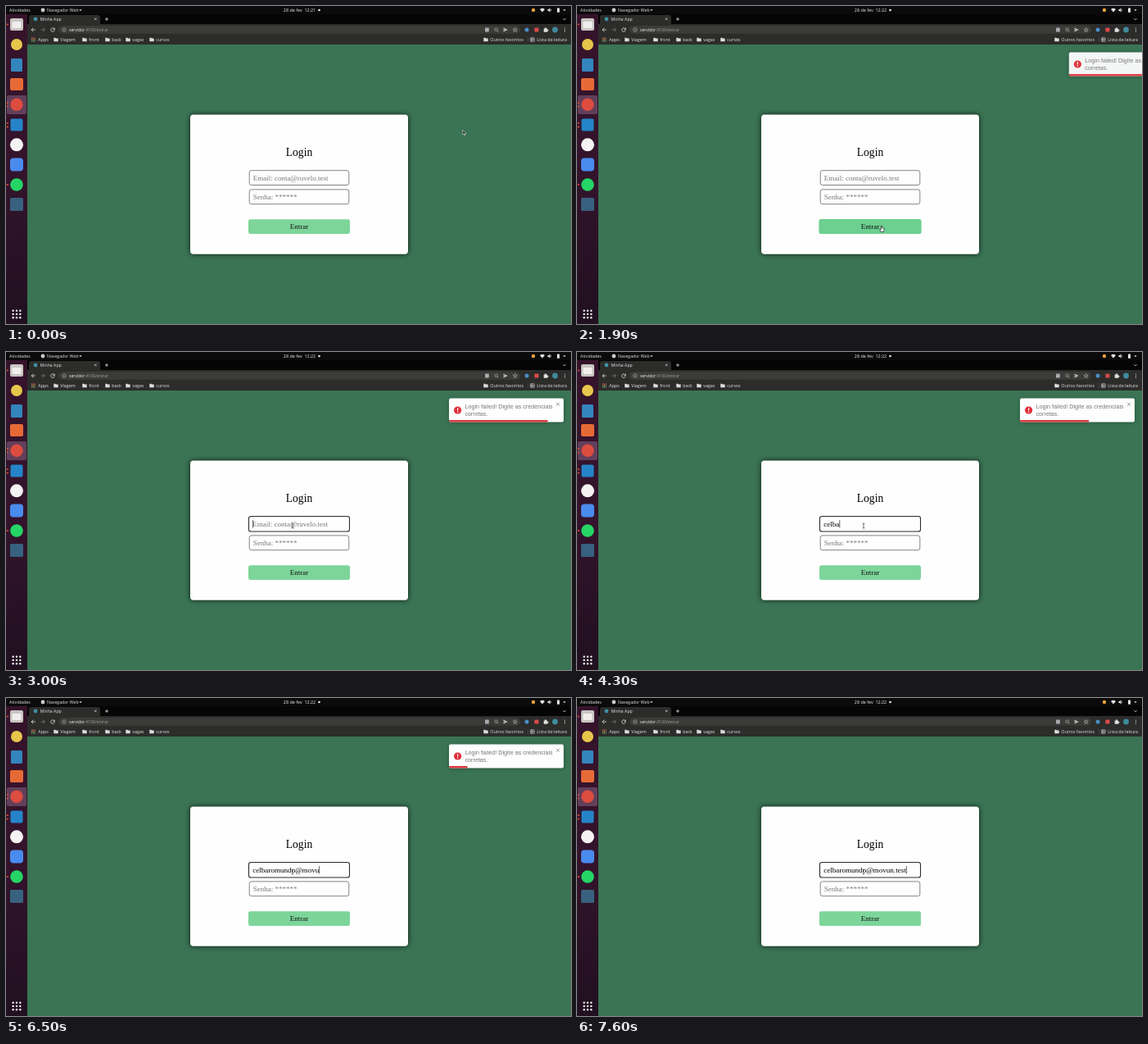
An HTML page with a canvas for the animation above (8000 ms loop, 690 px wide and 388 px high).

```html
<!DOCTYPE html>
<html lang="pt">
<head>
<meta charset="utf-8">
<style>
html, body { margin: 0; width: 100%; height: 100%; overflow: hidden; background: #3a7454; }
canvas { display: block; }
</style>
</head>
<body>
<canvas id="stage" width="690" height="388"></canvas>
<script>
const g = document.getElementById('stage').getContext('2d');
const UI = '"Open Sans", "Noto Sans", sans-serif';
const SERIF = '"Liberation Serif", serif';
const SANS = '"Liberation Sans", sans-serif';
const LOOP = 8000;

const EMAIL = 'celbaromundo@movun.test';
const KEYS = [3700, 3850, 4000, 4150, 4280, 4450, 4600, 4750, 4900, 5000, 5150, 5400,
  5800, 6150, 6300, 6400, 6500, 6700, 6950, 7150, 7250, 7350, 7500];
const FOCUS = 2930;
const TOAST_IN = 1633, BAR_START = 2305, BAR_TIME = 5000, TOAST_OUT = BAR_START + BAR_TIME;

const clamp = v => Math.max(0, Math.min(1, v));
const lerp = (a, b, p) => a + (b - a) * p;
const outCubic = p => 1 - (1 - p) ** 3;
const smooth = p => p * p * (3 - 2 * p);

function text(s, x, y, size, color, font = UI, align = 'left') {
  g.font = `${size}px ${font}`;
  g.fillStyle = color;
  g.textAlign = align;
  g.fillText(s, x, y);
}
function rect(x, y, w, h, color, r = 0) {
  g.fillStyle = color;
  g.beginPath();
  g.roundRect(x, y, w, h, r);
  g.fill();
}
function disc(x, y, r, color) {
  g.fillStyle = color;
  g.beginPath();
  g.arc(x, y, r, 0, 7);
  g.fill();
}
function frame(x, y, w, h, r, color, width) {
  g.strokeStyle = color;
  g.lineWidth = width;
  g.beginPath();
  g.roundRect(x, y, w, h, r);
  g.stroke();
}
function trace(d, x, y, color, width = 0.8) {
  g.save();
  g.translate(x, y);
  g.strokeStyle = color;
  g.lineWidth = width;
  g.stroke(new Path2D(d));
  g.restore();
}
function solid(d, x, y, color) {
  g.save();
  g.translate(x, y);
  g.fillStyle = color;
  g.fill(new Path2D(d));
  g.restore();
}
function shadow(color, blur, y = 0) {
  g.shadowColor = color;
  g.shadowBlur = blur;
  g.shadowOffsetY = y;
}
const noShadow = () => shadow('transparent', 0);
const cross = (x, y, r, color, w) => trace(`M${-r} ${-r}L${r} ${r}M${r} ${-r}L${-r} ${r}`, x, y, color, w);
const folder = (x, y) => solid('M-2.7-2.2h2l.8.8h2.6v3.6h-5.4z', x, y, '#dcdcdc');

function topBar(t) {
  rect(0, 0, 690, 10, '#0b0b0b');
  text('Atividades', 4, 6.9, 5.4, '#e4e4e4');
  disc(45, 5, 2.4, '#ccc');
  text('Navegador Web', 50, 6.9, 5.2, '#e4e4e4');
  solid('M-1.6-.8h3.2l-1.6 2z', 91, 5, '#ddd');
  text('28 de fev  ' + (t < 900 ? '12:21' : '12:22'), 358.5, 6.9, 5.4, '#eee', UI, 'center');
  disc(382.5, 5, 1.3, '#eee');
  disc(644, 5, 2.2, '#e8a13c');
  solid('M0 2.4L-3-1Q0-3.4 3-1z', 655, 5, '#e4e4e4');
  solid('M-2.5-.9h1.2L.4-2.4v4.8l-1.7-1.5h-1.2z', 664, 5, '#e4e4e4');
  trace('M1.2-1.4Q2.4 0 1.2 1.4', 664, 5, '#e4e4e4', 0.6);
  rect(673, 2.5, 3, 5.2, '#e4e4e4', 0.5);
  solid('M-1.6-.8h3.2l-1.6 2z', 682, 5, '#ddd');
}

function browserBar() {
  rect(26, 10, 664, 12, '#050505');
  rect(28, 11, 87, 12, '#2c2c2b', [3, 3, 0, 0]);
  disc(36, 16, 2.4, '#3f8fa3');
  text('Minha App', 41.5, 17.9, 5.2, '#e6e6e6');
  cross(109.3, 15.8, 1.3, '#ddd', 0.7);
  trace('M-2 0h4M0-2v4', 123, 16, '#ddd');
  trace('M-1.7-.8L0 .9 1.7-.8', 682, 16, '#ddd');

  rect(26, 22, 664, 25, '#2c2c2b');
  rect(64, 24, 564, 9.8, '#3b3b38', 5);
  trace('M2.5 0h-5M-.2-2.3L-2.5 0l2.3 2.3', 33.5, 29, '#e0e0e0');
  trace('M-2.5 0h5M.2-2.3L2.5 0 .2 2.3', 45, 29, '#7d7d7d');
  trace('M1.7-1.5A2.3 2.3 0 1 0 2.3.4M2.4-2.4v2h-2', 57, 29, '#e0e0e0');
  trace('M2.2 0A2.2 2.2 0 1 1-2.2 0A2.2 2.2 0 1 1 2.2 0M0-.3v1.5M0-1.3v.6', 71, 29, '#bbb', 0.6);
  text('servidor', 77, 30.8, 5, '#f2f2f2');
  text(':4100/entrar', 77 + g.measureText('servidor').width, 30.8, 5, '#a2a2a0');

  rect(585, 26.6, 4.8, 4.8, '#a9acb0', 0.6);
  trace('M1.3-.4A1.7 1.7 0 1 1-2.1-.4A1.7 1.7 0 1 1 1.3-.4M.8.8L2.4 2.4', 599, 29, '#b5b7ba', 0.7);
  solid('M-2.5-2.4L2.8 0l-5.3 2.4v-1.8L.6 0l-3.1-.6z', 610, 29, '#c5c7ca');
  trace('M0-2.5L.7-.8 2.5-.7 1.1.5 1.6 2.3 0 1.3-1.6 2.3-1.1.5-2.5-.7-.7-.8z', 621.7, 29, '#c5c7ca', 0.6);
  disc(636, 29, 2.5, '#4b8fc6');
  rect(645.3, 26.4, 5.2, 5.2, '#d94a48', 1);
  solid('M-2.3-1.4h1.4a.9.9 0 1 1 1.7 0h1.4v1.4a.9.9 0 1 1 0 1.6v1.2h-4.5z', 659, 28.9, '#ddd');
  disc(670.5, 29, 3.4, '#3f8b9e');
  for (let i = -1; i < 2; i++) disc(682.5, 29 + i * 1.9, 0.6, '#ddd');

  const tints = ['#d9685c', '#e2b34c', '#69a878'];
  for (let i = 0; i < 9; i++) rect(31 + i % 3 * 1.8, 38.6 + (i / 3 | 0) * 1.8, 1.2, 1.2, tints[i / 3 | 0]);
  text('Apps', 39.3, 42.7, 5.4, '#e6e6e6');
  [['Viagem', 61], ['front', 96], ['back', 124], ['vagas', 149], ['cursos', 178]].forEach(([s, x]) => {
    folder(x, 41);
    text(s, x + 5.2, 42.7, 5.4, '#e6e6e6');
  });
  folder(586, 41);
  text('Outros favoritos', 591.3, 42.7, 5.4, '#e6e6e6');
  rect(637, 38, 0.6, 6, '#555');
  frame(640.6, 38.7, 4.6, 4.6, 0.4, '#d0d2d5', 0.6);
  trace('M-2.3-.7h4.6M-2.3.8h4.6M-.8-2.3v4.6', 642.9, 41, '#d0d2d5', 0.6);
  text('Lista de leitura', 648.3, 42.7, 5.4, '#e6e6e6');
}

function dock() {
  const fill = g.createLinearGradient(0, 10, 0, 388);
  fill.addColorStop(0, '#35132b');
  fill.addColorStop(0.5, '#34142c');
  fill.addColorStop(1, '#201020');
  rect(0, 10, 26, 378, fill);
  rect(1, 109, 24, 23, '#623f5a', 2);
  rect(5, 15, 16, 15, '#c9c5c2', 2);
  rect(7.5, 19, 11, 8, '#f1efed', 1);
  disc(13, 47, 7, '#e7c64c');
  rect(6, 64, 14, 16, '#3385bd', 1.5);
  rect(5, 88, 16, 15, '#e66a36', 2);
  disc(13, 120.3, 7.7, '#dc4c3f');
  rect(5.5, 137.5, 15, 15, '#2584c8', 2);
  disc(13, 169.3, 8, '#f4f2f3');
  rect(5, 185.5, 16, 16, '#4a8bee', 4);
  disc(13, 218, 7.8, '#25d565');
  rect(5, 234, 16, 16, '#37617f', 1.5);
  [22.5, 118, 122.5, 143, 147.5, 218].forEach(y => disc(1.9, y, 1.1, '#e3532c'));
  for (let i = 0; i < 9; i++) disc(8.7 + i % 3 * 4.3, 371.7 + (i / 3 | 0) * 4.3, 1.25, '#eee');
}

function field(y, focused) {
  if (focused) frame(296.5, y, 123, 18.5, 2.6, '#2c2c2c', 1.1);
  else frame(297.2, y + 0.2, 121.6, 17.8, 2.5, '#666', 0.8);
}

function login(t, hover) {
  shadow('rgba(0,0,0,.8)', 6);
  rect(225, 132.5, 266, 170.3, '#fefefe', 4);
  noShadow();
  text('Login', 358, 183, 13.6, '#000', SERIF, 'center');

  const focused = t >= FOCUS;
  const count = KEYS.filter(k => k <= t).length;
  const x = focused ? 301.2 : 301.8;
  field(200.5, focused);
  if (count) text(EMAIL.slice(0, count), x, 212.5, 9.1, '#000', SERIF);
  else text('Email: conta@ruvelo.test', x, 212.5, 9, '#777', SERIF);
  if (focused) {
    const since = t - (count ? KEYS[count - 1] : FOCUS);
    const end = x + (count ? g.measureText(EMAIL.slice(0, count)).width : 0);
    if (since % 1000 < 500) rect(end + 0.2, 205, 0.6, 9.5, '#000');
  }
  field(223.7, false);
  text('Senha: ******', 301.8, 235.7, 9, '#777', SERIF);

  const grow = hover ? 0.6 : 0;
  rect(296 - grow, 260.2 - grow / 5, 124 + 2 * grow, 17.8 + grow / 2.5, hover ? '#6dcf90' : '#7dd59a', 2.5);
  text('Entrar', 358, 272, 9.1, '#111', SERIF, 'center');
}

// Offset and opacity of the notice: bounce in from the right, then out again.
function toastPose(t) {
  if (t >= TOAST_OUT) {
    const p = (t - TOAST_OUT) / 700;
    if (p < 0.2) return [lerp(0, -10, smooth(p / 0.2)), 1];
    const e = smooth(clamp((p - 0.2) / 0.8));
    return [lerp(-10, 1010, e), 1 - e];
  }
  const p = clamp((t - TOAST_IN) / 700);
  const stops = [[0, 1515], [0.6, -12.6], [0.75, 5], [0.9, -2.5], [1, 0]];
  const i = Math.max(1, stops.findIndex(s => p <= s[0]));
  const [p0, x0] = stops[i - 1], [p1, x1] = stops[i];
  const e = outCubic((p - p0) / (p1 - p0));
  return [lerp(x0, x1, e), i === 1 ? e : 1];
}

function toast(t) {
  if (t < TOAST_IN) return;
  const [dx, alpha] = toastPose(t);
  if (dx > 150) return;
  g.save();
  g.translate(541 + dx, 56.5);
  g.globalAlpha = alpha;
  shadow('rgba(0,0,0,.25)', 5, 1);
  rect(0, 0, 140, 29, '#fefefe', 2);
  noShadow();
  disc(10.6, 14.5, 4.6, '#df2f3a');
  rect(10, 11.7, 1.2, 3.4, '#fff');
  rect(10, 16, 1.2, 1.2, '#fff');
  text('Login failed! Digite as credenciais', 19.5, 12.9, 7.2, '#777', SANS);
  text('corretas.', 19.5, 21.1, 7.2, '#777', SANS);
  cross(133, 7.2, 1.9, '#888', 0.9);
  rect(0, 26.5, 140 * (1 - clamp((t - BAR_START) / BAR_TIME)), 2.5, '#dc3940', [0, 0, 0, 2]);
  g.restore();
}

function pointer(t) {
  const a = smooth(clamp((t - 450) / 900)), b = smooth(clamp((t - 2500) / 380));
  return [lerp(lerp(558, 372, a), 350, b), lerp(lerp(151.5, 269, a), 212, b)];
}
const inside = (x, y, top, bottom) => x > 296 && x < 420 && y > top && y < bottom;

function cursor(x, y) {
  if (inside(x, y, 260, 278)) {
    const hand = 'M-.6-.8Q0-1.5.6-.8V1.6L2.8 2.2Q3.4 2.7 3 4.2L2.3 6.6H-.9L-2.5 3.7Q-2.4 2.8-.6 3.6z';
    solid(hand, x, y, '#f4f4f4');
    trace(hand, x, y, '#222', 0.7);
  } else if (inside(x, y, 200, 219) || inside(x, y, 223, 242)) {
    trace('M-1.3-2.8H1.3M0-2.8V2.8M-1.3 2.8H1.3', x, y, '#333', 0.7);
  } else {
    const arrow = 'M0 0V5.4L1.2 4.3 2.1 6.4 3 6 2.1 4H3.8z';
    solid(arrow, x, y, '#111');
    trace(arrow, x, y, '#eee', 0.6);
  }
}

function draw(now) {
  const t = now % LOOP;
  const [x, y] = pointer(t);
  rect(0, 0, 690, 388, '#3a7454');
  login(t, inside(x, y, 260, 278));
  toast(t);
  browserBar();
  topBar(t);
  dock();
  cursor(x, y);
}

const start = performance.now();
function tick() {
  draw(performance.now() - start);
  requestAnimationFrame(tick);
}
tick();
</script>
</body>
</html>
```
